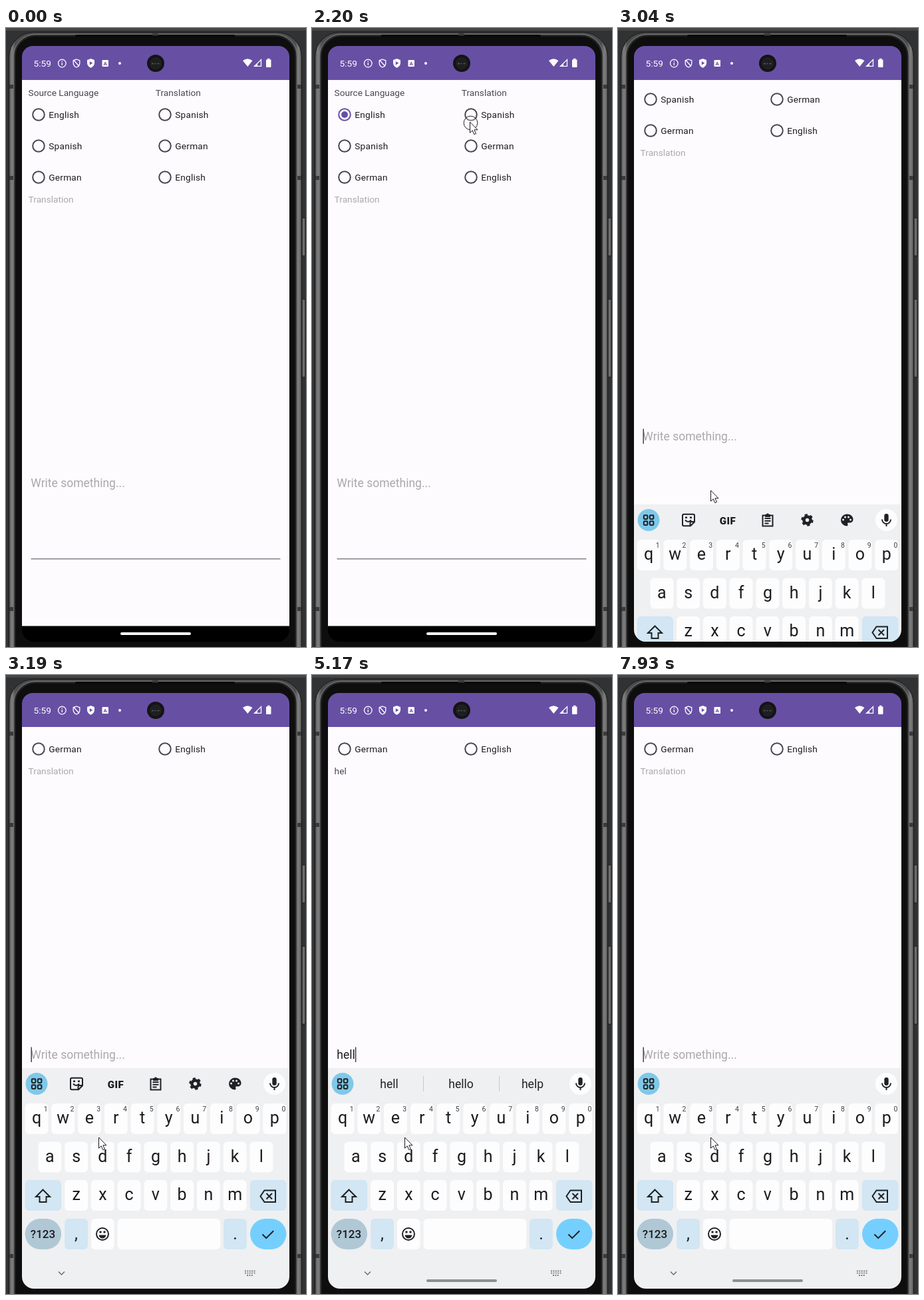
An HTML page for the animation above (8000 ms loop, 451x929 px).

```html
<!DOCTYPE html>
<html lang="en">
<head>
<meta charset="utf-8">
<title>Translator</title>
<style>
html, body { margin: 0; width: 100%; height: 100%; overflow: hidden; background: #303234; }
svg { display: block; width: 100%; height: 100%; }
text { font: 13.7px Roboto, sans-serif; fill: #1c1b1f; }
.label { fill: #49454f; }
.hint { fill: #aba8ab; }
.field { font-size: 17.5px; }
.radio text { letter-spacing: .24px; }
.radio circle { fill: none; stroke: #49454f; stroke-width: 2; }
.radio .dot { display: none; stroke: none; fill: #6750a4; }
.radio .ripple { stroke: none; fill: #6750a4; opacity: 0; }
.on .ring { stroke: #6750a4; }
.on .dot { display: inline; }
.mid { text-anchor: middle; }
.key { font-size: 25px; text-anchor: middle; }
.digit { font-size: 10.5px; text-anchor: middle; fill: #3c4043; }
.word { font-size: 17.6px; text-anchor: middle; fill: #202124; }
.line { fill: none; stroke: #1f2124; stroke-width: 2; }
.ink { fill: #1f2124; }
.white { fill: #fff; }
</style>
</head>
<body>
<svg viewBox="0 0 451 929" preserveAspectRatio="none">
  <defs>
    <clipPath id="screenClip"><path d="M24 43a16 16 0 0 1 16-16h370a16 16 0 0 1 16 16v860a18 18 0 0 1-18 18H42a18 18 0 0 1-18-18z"/></clipPath>
    <clipPath id="appClip"><rect x="24" y="78" width="402" height="819"/></clipPath>
    <linearGradient id="metal">
      <stop offset="0" stop-color="#4a4a4a"/><stop offset=".01" stop-color="#828282"/>
      <stop offset=".022" stop-color="#4c4c4c"/><stop offset=".978" stop-color="#4c4c4c"/>
      <stop offset=".99" stop-color="#828282"/><stop offset="1" stop-color="#4a4a4a"/>
    </linearGradient>
  </defs>

  <!-- phone body -->
  <rect width="451" height="4" fill="#444648"/>
  <rect x="445" y="285" width="5" height="57" rx="1.5" fill="#6d6d6d" stroke="#151515"/>
  <rect x="445" y="407" width="5" height="117" rx="1.5" fill="#6d6d6d" stroke="#151515"/>
  <rect x="4.500" y="6.500" width="440" height="980" rx="37" fill="url(#metal)" stroke="#181818"/>
  <rect x="11" y="9.500" width="427" height="980" rx="33" fill="none" stroke="#777"/>
  <rect x="13.500" y="11.500" width="422" height="980" rx="31" fill="#0e0e0e" stroke="#242424" stroke-width="2"/>
  <rect x="104" y="10" width="240" height="3.500" rx="1.700" fill="#080808"/>
  <path d="M220 7.500h9v4h-9zM5 85h6v6H5zM5 222h6v6H5zM5 869h6v6H5zM438 85h6v6h-6zM438 222h6v6h-6zM438 869h6v6h-6z" fill="#3a3a3a"/>

  <g clip-path="url(#screenClip)">
    <rect x="24" y="27" width="402" height="894"/>
    <rect x="24" y="78" width="402" height="819.500" fill="#fefbfe"/>
    <g clip-path="url(#appClip)">
      <g id="app">
        <text class="label" x="33.500" y="102">Source Language</text>
        <text class="label" x="224.800" y="102">Translation</text>
        <g id="radios"></g>
        <text id="result" x="33.600" y="262"></text>
        <text id="input" class="field" x="37.300" y="689"></text>
        <rect id="caret" y="671.500" width="1.600" height="22.500" fill="#4f4a5c"/>
        <path id="rule" d="M37.500 796.800H412.500" stroke="#49454f"/>
      </g>
    </g>
    <rect x="172" y="907" width="106" height="4" rx="2" class="white"/>

    <!-- status bar -->
    <rect x="24" y="27" width="402" height="51" fill="#6750a4"/>
    <text class="white" x="41.500" y="58">5:59</text>
    <g fill="none" stroke="#fff" stroke-width="1.300">
      <circle cx="84.300" cy="53" r="5.800"/>
      <path d="M84.300 52v4M84.300 49.300v1.400M106 47l4.800 1.800v3.700c0 3-2 5.400-4.800 6.500-2.800-1.100-4.800-3.500-4.800-6.500v-3.700zM102 48.500l8 9"/>
      <path d="M373.500 57.400h10V47.500z"/>
    </g>
    <path class="white" d="M127.500 46l5.500 2.100v4.200c0 3.500-2.300 6.200-5.500 7.500-3.200-1.300-5.500-4-5.500-7.500v-4.200z"/>
    <path fill="#6750a4" d="M125.800 50v5.600l4.500-2.800z"/>
    <rect class="white" x="144.500" y="48" width="9.500" height="10" rx="1"/>
    <text x="149.200" y="56" class="mid" style="font-size:8px;font-weight:700;fill:#6750a4">A</text>
    <circle class="white" cx="171" cy="53" r="2"/>
    <path class="white" d="M356 49q7-5.500 14.500 0l-7.200 9zM378 53v5h-5zM391 47.500h2v-1.700h3.500v1.700h2V58q0 1-1 1H392q-1 0-1-1z"/>
    <circle cx="225" cy="53" r="13" fill="#141416"/>
    <circle cx="225" cy="53" r="8" fill="#1d1e20" stroke="#29292c"/>
    <path d="M219 53.500h3M223.500 53.500h2M227.500 53.500h3" stroke="#55575c" stroke-width="1.500"/>

    <!-- keyboard -->
    <g id="board">
      <rect x="24" y="590" width="402" height="340" fill="#eff0f2"/>
      <g id="keys"></g>
      <circle cx="46" cy="613.500" r="16.500" fill="#7fc8e9"/>
      <g class="line" stroke-width="1.800">
        <rect x="38.800" y="606.300" width="5.600" height="5.600" rx="1.300"/><rect x="47.800" y="606.300" width="5.600" height="5.600" rx="1.300"/>
        <rect x="38.800" y="615.300" width="5.600" height="5.600" rx="1.300"/><rect x="47.800" y="615.300" width="5.600" height="5.600" rx="1.300"/>
      </g>
      <circle cx="403.500" cy="613.500" r="16.500" fill="#fdfdfe"/>
      <rect class="ink" x="400.300" y="604" width="6.400" height="12" rx="3.200"/>
      <path class="line" d="M397 612.500a6.500 6.500 0 0 0 13 0M403.500 619v4"/>
      <g id="tools">
        <path class="line" d="M99 604.800h14a2 2 0 0 1 2 2v9.500l-6 6H99a2 2 0 0 1-2-2v-13.500a2 2 0 0 1 2-2zM115 616h-4.500a2 2 0 0 0-2 2v4M101 613.500q4.500 5 9 0"/>
        <path class="ink" d="M101 608.500h3v2.500h-3zM108 608.500h3v2.500h-3z"/>
        <text class="mid" x="165" y="619.500" style="font-size:15px;font-weight:900;letter-spacing:.5px">GIF</text>
        <path class="line" d="M217.500 606.500h15V622.500h-15zM220.500 611h9M220.500 614.800h9M220.500 618.500h6"/>
        <path class="ink" d="M221 605h2a2.100 2.100 0 0 1 4 0h2v4h-8z"/>
        <circle class="line" cx="284.500" cy="613.500" r="5" style="stroke-width:4.500"/>
        <circle class="line" cx="284.500" cy="613.500" r="7.700" stroke-dasharray="4.200 3.860" style="stroke-width:3"/>
        <path class="ink" d="M344 604.500c5.500 0 9.500 3.500 9.500 8 0 3.300-2.500 5-5 5h-2c-2.400 0-1 2-1 3.300 0 1-.6 1.700-1.500 1.700a9 9 0 0 1 0-18z"/>
        <path d="M338.500 613h.01M341.500 609h.01M346.500 609h.01M349.500 613h.01" stroke="#eff0f2" stroke-width="3" stroke-linecap="round"/>
      </g>
      <g id="words">
        <path d="M167.500 602v23M281.500 602v23" stroke="#c6c8cb"/>
        <text class="word" x="116" y="620"></text>
        <text class="word" x="224" y="620"></text>
        <text class="word" x="331.500" y="620"></text>
        <g id="faces">
          <path d="M332 602v23" stroke="#c6c8cb"/>
          <g stroke="#fbc02d" stroke-width="3.200" stroke-linecap="round">
            <path d="M302 609l6 7M305.500 606l6 8M309.500 606l4 8M300.500 614l5 5M315 610.500v6"/>
            <ellipse cx="310" cy="616.500" rx="4" ry="4.500" fill="#fbc02d"/>
          </g>
          <path d="M299 619q1 3 4 4M313 605q3 1 4 4" fill="none" stroke="#7fb5d6" stroke-width="1.300"/>
          <circle cx="358" cy="612.500" r="9" fill="#fcc934"/>
          <path d="M353 613h10q-1 5-5 5t-5-5z" fill="#6b3f1d"/>
          <path d="M352.500 610.500q1.700-3 3.400 0M360 610.500q1.700-3 3.400 0" fill="none" stroke="#6b3f1d" stroke-width="1.300"/>
          <path d="M350 618.500l4 2.500M366 618.500l-4 2.500" stroke="#f4a12a" stroke-width="4.500" stroke-linecap="round"/>
        </g>
      </g>
      <g class="line">
        <path d="M55.500 772.500l10.500 10.500h-5.500v8h-10v-8H45z"/>
        <path d="M388.500 773.500h16.500v17.500h-16.500l-6-8.700zM391.500 778l8.500 8.500M400 778l-8.500 8.500"/>
        <circle cx="145" cy="839" r="9"/>
        <path d="M385.500 839.500l5.700 5.700 11-11"/>
      </g>
      <path class="ink" d="M140.500 834.500h3v3h-3zM146.500 834.500h3v3h-3zM139.500 840.500h11q-1 5-5.500 5t-5.500-5z"/>
      <path d="M79 895.500l4.500 4.500 4.500-4.500" fill="none" stroke="#6c6d70" stroke-width="1.500"/>
      <path d="M359 894.500h16M359 897.700h16M362 901h9" stroke="#77787b" stroke-width="1.800" stroke-dasharray="1.900 1.500"/>
      <rect id="handle" x="172" y="907" width="106" height="4" rx="2" fill="#8e8f91"/>
    </g>
  </g>

  <g id="pointer">
    <circle id="press" cx="1" cy="1.500" r="10.300" fill="#fff" fill-opacity=".3" stroke="#222"/>
    <path d="M0 0V16.200L3.700 12.800 6.300 18.700 9 17.500 6.400 11.800H11.500z" fill="#fff" stroke="#1a1a1a" stroke-linejoin="round"/>
  </g>
</svg>

<script>
const $ = id => document.getElementById(id);
const show = (el, on) => el.style.display = on ? 'inline' : 'none';
// latest row whose start time has passed
const at = (rows, t) => rows.filter(r => r[0] <= t).pop();

const radio = (x, y, name) => `<g class="radio"><circle class="ripple" cx="${x}" cy="${y}" r="14"/>
  <circle class="ring" cx="${x}" cy="${y}" r="8.8"/><circle class="dot" cx="${x}" cy="${y}" r="5"/>
  <text x="${x + 15.2}" y="${y + 5.3}">${name}</text></g>`;
const column = (x, names) => names.map((n, i) => radio(x, 130 + 47 * i, n)).join('');
$('radios').innerHTML = column(49, ['English', 'Spanish', 'German']) + column(239, ['Spanish', 'German', 'English']);
const radios = $('radios').children;

const cap = (x, y, w, fill = '#fdfdfe', r = 6) =>
  `<rect x="${x}" y="${y}" width="${w}" height="46" rx="${r}" fill="${fill}"/>`;
const letters = (row, left, y) => [...row].map((c, i) => {
  const x = left + 39.75 * i;
  const digit = y < 650 ? `<text class="digit" x="${x + 31}" y="655">${(i + 1) % 10}</text>` : '';
  return cap(x, y, 34.8) + `<text class="key" x="${x + 17.4}" y="${y + 30}">${c}</text>` + digit;
}).join('');
const blue = '#d2e6f3';
$('keys').innerHTML = letters('qwertyuiop', 28.6, 643) + letters('asdfghjkl', 48.5, 700.5) +
  letters('zxcvbnm', 88.2, 758) + cap(28.6, 758, 54.5, blue) + cap(367, 758, 54.5, blue) +
  cap(28.6, 816, 54.5, '#b0c8d5', 23) + cap(88.2, 816, 34.8, blue) + cap(128, 816, 34.5) +
  cap(167.700, 816, 154.500) + cap(327, 816, 34.8, blue) + cap(367, 816, 54.5, '#75cffe', 23) +
  `<text class="mid" x="55.500" y="845" style="font-size:17px;font-weight:500">?123</text>
   <text class="key" x="105.500" y="847">,</text><text class="key" x="344.500" y="847">.</text>`;

// time, x, y, pressed
const moves = [
  [0, -30, 400], [270, 3, 368], [400, 42, 312], [540, 74, 248], [670, 83, 192], [800, 70, 152],
  [930, 58.5, 132], [1390, 58.5, 132, 1], [1540, 58.5, 132], [1660, 120, 136], [1800, 200, 140],
  [1930, 237.5, 141], [2200, 237.5, 141, 1], [2340, 228, 190], [2480, 180, 440],
  [2610, 139.5, 694], [2750, 139.5, 694, 1], [2920, 139.5, 694]
];
// time, typed, translated, caret, suggestions
const edits = [
  [0, '', '', 0, 'tools'], [2920, '', '', 1, 'tools'], [3480, '', '', 0, 'tools'],
  [3750, 'h', '', 1, 'h hi how'], [3890, 'h', 'h', 0, 'h hi how'], [4160, 'h', 'h', 1, 'h hi how'],
  [4430, 'he', 'h', 1, 'he hey how'], [4580, 'he', 'él', 1, 'he hey how'],
  [4890, 'hel', 'él', 1, 'hel hello help'], [5030, 'hell', 'hel', 1, 'hell hello help'],
  [5440, 'hello', 'infierno', 1, 'hell hello help'], [5710, 'hello', 'infierno', 0, 'hello hellos'],
  [5980, 'hello', 'hola', 0, 'hello hellos'], [6120, 'hello', 'hola', 1, 'hello hellos'],
  [6410, 'hello', 'hola', 0, 'hello hellos'], [6960, 'hello', 'hola', 1, 'hello hellos'],
  [7260, 'hell', 'hola', 1, 'hell hello help'], [7390, 'hel', 'hola', 1, 'hel hello help'],
  [7530, 'he', 'hel', 1, 'he hey how'], [7660, 'h', 'él', 1, 'h hi how'],
  [7800, '', 'h', 1, ''], [7930, '', '', 1, '']
];
// time, page shift, keyboard drop
const slides = [[0, 0, 340], [3040, 70, 125], [3190, 113, 0]];

function choose(el, t, since) {
  el.classList.toggle('on', t >= since);
  el.firstChild.style.opacity = t < since || t >= since + 260 ? 0 : t < since + 120 ? .14 : .07;
}

function setText(el, text, hint, style) {
  el.textContent = text || hint;
  el.setAttribute('class', text ? style : style + ' hint');
}

function draw(t) {
  const [, x, y, pressed] = at(moves, t);
  $('pointer').setAttribute('transform', `translate(${x} ${y})`);
  show($('press'), pressed);
  choose(radios[0], t, 1540);
  choose(radios[3], t, 2340);

  const [, shift, drop] = at(slides, t);
  $('app').setAttribute('transform', `translate(0 ${-shift})`);
  $('board').setAttribute('transform', `translate(0 ${drop})`);
  show($('handle'), t >= 3340);
  const focused = t >= 2920;
  $('rule').setAttribute('stroke', focused ? '#5b5370' : '#49454f');
  $('rule').setAttribute('stroke-width', focused ? 2 : 1);

  const [, typed, translated, caret, list] = at(edits, t);
  setText($('result'), translated, 'Translation', 'label');
  setText($('input'), typed, 'Write something...', 'field');
  show($('caret'), caret);
  $('caret').setAttribute('x', 37.4 + (typed ? $('input').getComputedTextLength() : 0));

  const tools = list === 'tools', words = list.split(' ');
  show($('tools'), tools);
  show($('words'), list && !tools);
  show($('faces'), words.length === 2);
  $('words').querySelectorAll('text').forEach((el, i) => el.textContent = words[i] || '');
}

const start = performance.now();
function tick() {
  draw((performance.now() - start) % 8000);
  requestAnimationFrame(tick);
}
tick();
</script>
</body>
</html>
```
